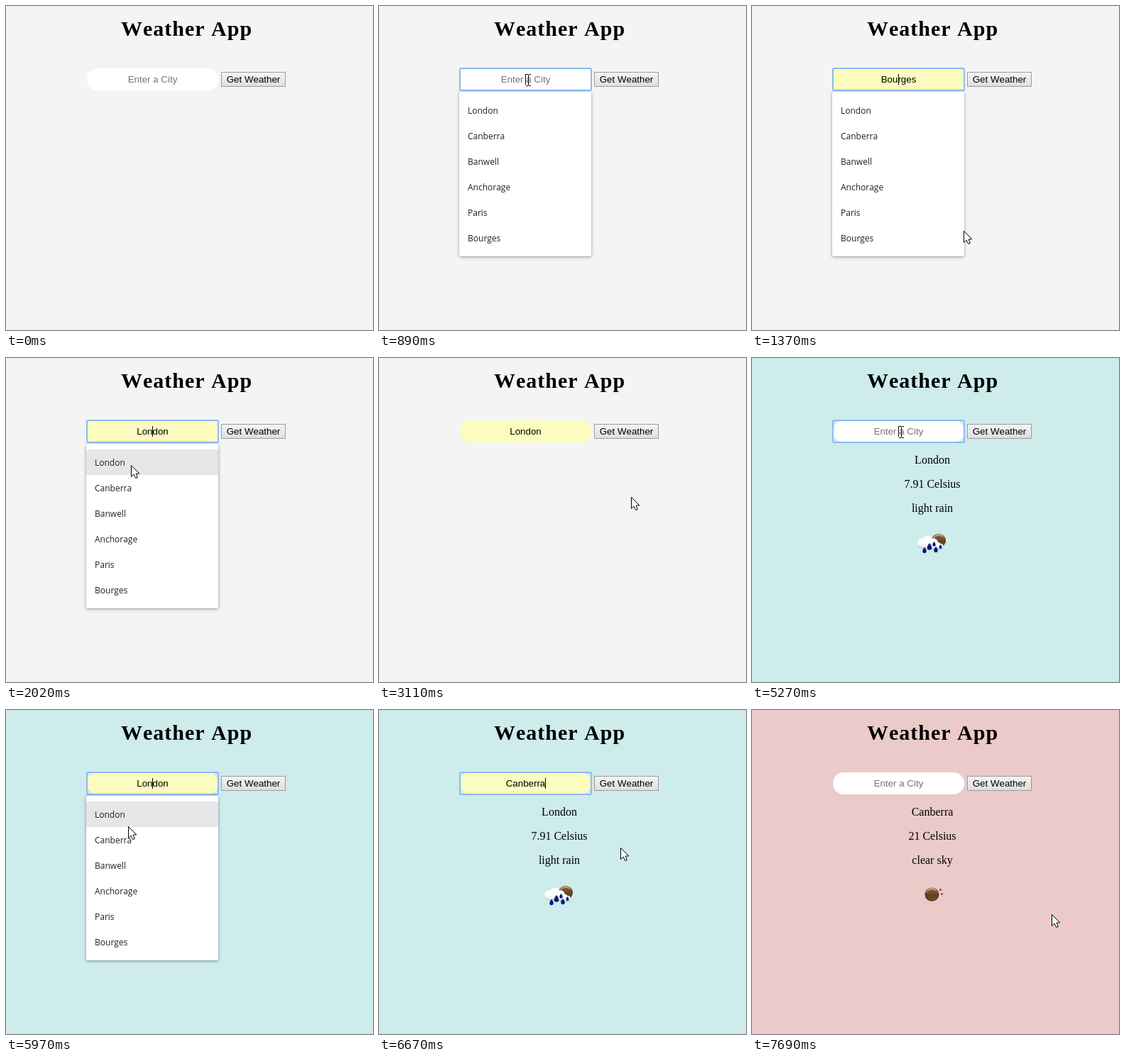
An HTML page with a canvas that plays this animation: 517x457 px, repeating every 8000 ms.

```html
<!DOCTYPE html>
<html lang="en">
<head>
<meta charset="utf-8">
<title>Weather App</title>
<style>
  html, body { margin: 0; width: 100%; height: 100%; overflow: hidden; background: #f4f4f4; }
  canvas { display: block; }
</style>
</head>
<body>
<canvas id="stage" width="517" height="457"></canvas>
<script>
const ctx = document.getElementById('stage').getContext('2d');
const LOOP = 8000;
const CENTER = 254;
const SANS = '13.333px "Liberation Sans", Arial, sans-serif';
const SERIF = '"Liberation Serif", "Times New Roman", serif';
const LIST_FONT = '12px "Open Sans", "Noto Sans", sans-serif';
const CITIES = ['London', 'Canberra', 'Banwell', 'Anchorage', 'Paris', 'Bourges'];
const REPORTS = {
  London: { bg: '#cdeceb', lines: ['London', '7.91 Celsius', 'light rain'], icon: drawRain },
  Canberra: { bg: '#ebcaca', lines: ['Canberra', '21 Celsius', 'clear sky'], icon: drawClear }
};

const FIELD = { x: 114, y: 88, w: 185, h: 31 };
const BUTTON = { x: 303, y: 93, w: 91, h: 21 };
const LIST = { x: 113, y: 121, w: 186, h: 232, top: 129, row: 36 };

const at = (x, y) => ({ x, y });
const inField = at(210, 104);
const onButton = at(348, 103);
const inRow = i => at(176, LIST.top + LIST.row * (i + 0.6));

// The pointer rests between moves
const ENTRY = 90;
const START = at(400, 435);
const MOVES = [
  { from: ENTRY, to: 490, goal: inField },
  { from: 890, to: 1370, goal: at(298, 317) },
  { from: 1370, to: 1450, goal: at(310, 318) },
  { from: 1610, to: 2010, goal: inRow(0) },
  { from: 2400, to: 2800, goal: onButton },
  { from: 2950, to: 3110, goal: at(355, 195) },
  { from: 3110, to: 3190, goal: at(387, 301) },
  { from: 4280, to: 4360, goal: at(384, 298) },
  { from: 4360, to: 4670, goal: at(186, 94) },
  { from: 4670, to: 4980, goal: at(357, 120) },
  { from: 4980, to: 5200, goal: inField },
  { from: 5820, to: 5970, goal: at(172, 164) },
  { from: 5970, to: 6130, goal: inRow(1) },
  { from: 6290, to: 6670, goal: at(340, 194) },
  { from: 6670, to: 6900, goal: onButton },
  { from: 7140, to: 7690, goal: at(422, 288) }
];

function pointerAt(t) {
  if (t < ENTRY) return null;
  let { x, y } = START;
  for (const { from, to, goal } of MOVES) {
    if (t < from) break;
    const k = Math.min(1, (t - from) / (to - from));
    x += (goal.x - x) * k;
    y += (goal.y - y) * k;
  }
  return at(Math.round(x), Math.round(y));
}

function stateAt(t) {
  const within = (from, to) => t >= from && t < to;
  return {
    report: t >= 7450 ? REPORTS.Canberra : t >= 3190 ? REPORTS.London : null,
    value: within(2160, 3190) ? 'London' : within(6290, 7450) ? 'Canberra' : '',
    focused: within(650, 2870) || within(5200, 7140),
    open: within(810, 2160) || within(5350, 6290),
    pointer: pointerAt(t)
  };
}

const inside = (p, r) => p.x >= r.x && p.x < r.x + r.w && p.y >= r.y && p.y < r.y + r.h;

function text(str, x, y, font, color = '#000', align = 'center') {
  ctx.font = font;
  ctx.fillStyle = color;
  ctx.textAlign = align;
  ctx.fillText(str, x, y);
}

function box({ x, y, w, h }, r, fill) {
  ctx.beginPath();
  ctx.roundRect(x, y, w, h, r);
  ctx.fillStyle = fill;
  ctx.fill();
}

function ellipse(x, y, rx, ry, fill) {
  ctx.beginPath();
  ctx.ellipse(x, y, rx, ry, 0, 0, Math.PI * 2);
  ctx.fillStyle = fill;
  ctx.fill();
}

function gradient(y0, y1, ...colors) {
  const g = ctx.createLinearGradient(0, y0, 0, y1);
  colors.forEach((c, i) => g.addColorStop(i / (colors.length - 1), c));
  return g;
}

function drawMoon(x, y) {
  ellipse(x, y, 10, 9.8, gradient(y - 10, y + 10, '#b79c70', '#4b2b13', '#3a210e'));
  ellipse(x + 0.5, y + 1.2, 8.7, 8, gradient(y - 7, y + 9, '#80603c', '#65401f', '#724a28'));
  ctx.beginPath();
  ctx.ellipse(x, y - 1, 7.5, 6.5, 0, Math.PI * 1.1, Math.PI * 1.8);
  ctx.strokeStyle = '#d6c4a0';
  ctx.lineWidth = 1;
  ctx.stroke();
}

function drawClear() {
  drawMoon(253.5, 260);
  ellipse(265.5, 253.5, 1.5, 1.5, '#6d4524');
  ellipse(267.5, 259.5, 1.5, 1.5, '#7d5029');
}

function drawCloud(x, y, s) {
  const white = gradient(y - 8 * s, y + 9 * s, '#fff', '#fff', '#dfe3e6');
  for (const [drop, fill] of [[0.6, '#9aa2a5'], [0, white]]) {
    for (let i = -1; i <= 1; i++) {
      ellipse(x + (i * 8 - 1.5) * s, y + drop + (Math.abs(i) * 4 - 3) * s, 7 * s, 6.8 * s, fill);
    }
    ellipse(x - 2 * s, y + drop + 3 * s, 9 * s, 5 * s, fill);
  }
}

function drawDrop(x, y, r) {
  ctx.beginPath();
  ctx.moveTo(x, y - r * 2);
  ctx.quadraticCurveTo(x + r, y - r, x + r, y);
  ctx.arc(x, y, r, 0, Math.PI);
  ctx.quadraticCurveTo(x - r, y - r, x, y - r * 2);
  ctx.fillStyle = '#07187a';
  ctx.fill();
}

function drawRain() {
  drawMoon(263, 257.5);
  drawCloud(249, 260, 0.97);
  drawCloud(262, 265, 0.55);
  drawDrop(243, 272.5, 2.7);
  drawDrop(250, 267.5, 3.3);
  drawDrop(256.5, 263.5, 2.2);
  drawDrop(259, 271.5, 2.7);
  drawDrop(265.5, 267, 2);
}

function drawField({ value, focused, report }, preview) {
  const shown = preview || value;
  const middle = FIELD.x + FIELD.w / 2;
  const radius = focused && !report ? 3 : 15;
  box(FIELD, radius, shown ? '#fbfcbd' : '#fff');
  if (focused) {
    ctx.beginPath();
    ctx.roundRect(FIELD.x, FIELD.y, FIELD.w, FIELD.h, 1.5);
    ctx.strokeStyle = '#8fb8f3';
    ctx.lineWidth = 2;
    ctx.stroke();
  }
  text(shown || 'Enter a City', middle, 108, SANS, shown ? '#000' : '#757575');
  if (focused) {
    // A previewed city is not typed yet, so the caret stays in the middle
    const typed = preview ? 0 : ctx.measureText(value).width;
    ctx.fillStyle = '#000';
    ctx.fillRect(Math.floor(middle + typed / 2), 96, 1, 15);
  }
}

function drawButton() {
  const { x, y, w, h } = BUTTON;
  box(BUTTON, 0, '#9c9c9c');
  box({ x: x + 1, y: y + 1, w: w - 2, h: h - 2 }, 0, gradient(y, y + h, '#f6f6f6', '#dddddd'));
  text('Get Weather', x + w / 2, 108, SANS);
}

function drawList(active) {
  ctx.save();
  ctx.shadowColor = 'rgba(0,0,0,.4)';
  ctx.shadowBlur = 4;
  ctx.shadowOffsetY = 1;
  box(LIST, 3, '#fff');
  ctx.restore();
  CITIES.forEach((city, i) => {
    const y = LIST.top + LIST.row * i;
    if (i === active) box({ x: LIST.x, y, w: LIST.w, h: LIST.row }, 0, '#e6e6e9');
    text(city, LIST.x + 12, y + 23, LIST_FONT, '#222', 'left');
  });
}

function drawPointer(p) {
  ctx.save();
  ctx.translate(p.x, p.y);
  if (inside(p, FIELD)) {
    ctx.fillStyle = '#000';
    ctx.fillRect(0, -7, 1, 15);
    for (const edge of [-8, 8]) {
      ctx.fillRect(-3, edge, 3, 1);
      ctx.fillRect(1, edge, 3, 1);
    }
  } else {
    ctx.translate(0.5, 0.5);
    ctx.beginPath();
    [[0, 0], [0, 16], [3.6, 12.6], [6.2, 18], [8.8, 17.2], [6.6, 11.6], [11.4, 11.4]]
      .forEach(([x, y]) => ctx.lineTo(x, y));
    ctx.closePath();
    ctx.fillStyle = '#fff';
    ctx.fill();
    ctx.strokeStyle = '#000';
    ctx.lineWidth = 1;
    ctx.stroke();
  }
  ctx.restore();
}

function drawTitle() {
  ctx.letterSpacing = '1px';
  text('Weather App', CENTER + 0.5, 42, 'bold 30px ' + SERIF);
  ctx.letterSpacing = '0px';
}

function draw(t) {
  const state = stateAt(t);
  const { report, open, pointer } = state;
  const hovered = open && inside(pointer, LIST) ? Math.floor((pointer.y - LIST.top) / LIST.row) : -1;

  ctx.fillStyle = report ? report.bg : '#f4f4f4';
  ctx.fillRect(0, 0, 517, 457);
  drawTitle();
  drawField(state, CITIES[hovered]);
  drawButton();
  if (report) {
    report.lines.forEach((line, i) => text(line, CENTER, 149 + i * 34, '16px ' + SERIF));
    report.icon();
  }
  // The highlight ends just inside the list's right edge
  if (open) drawList(pointer.x < LIST.x + LIST.w - 2 ? hovered : -1);
  if (pointer) drawPointer(pointer);
}

ctx.fontKerning = 'none';
function tick() {
  draw(performance.now() % LOOP);
  requestAnimationFrame(tick);
}
tick();
</script>
</body>
</html>
```
